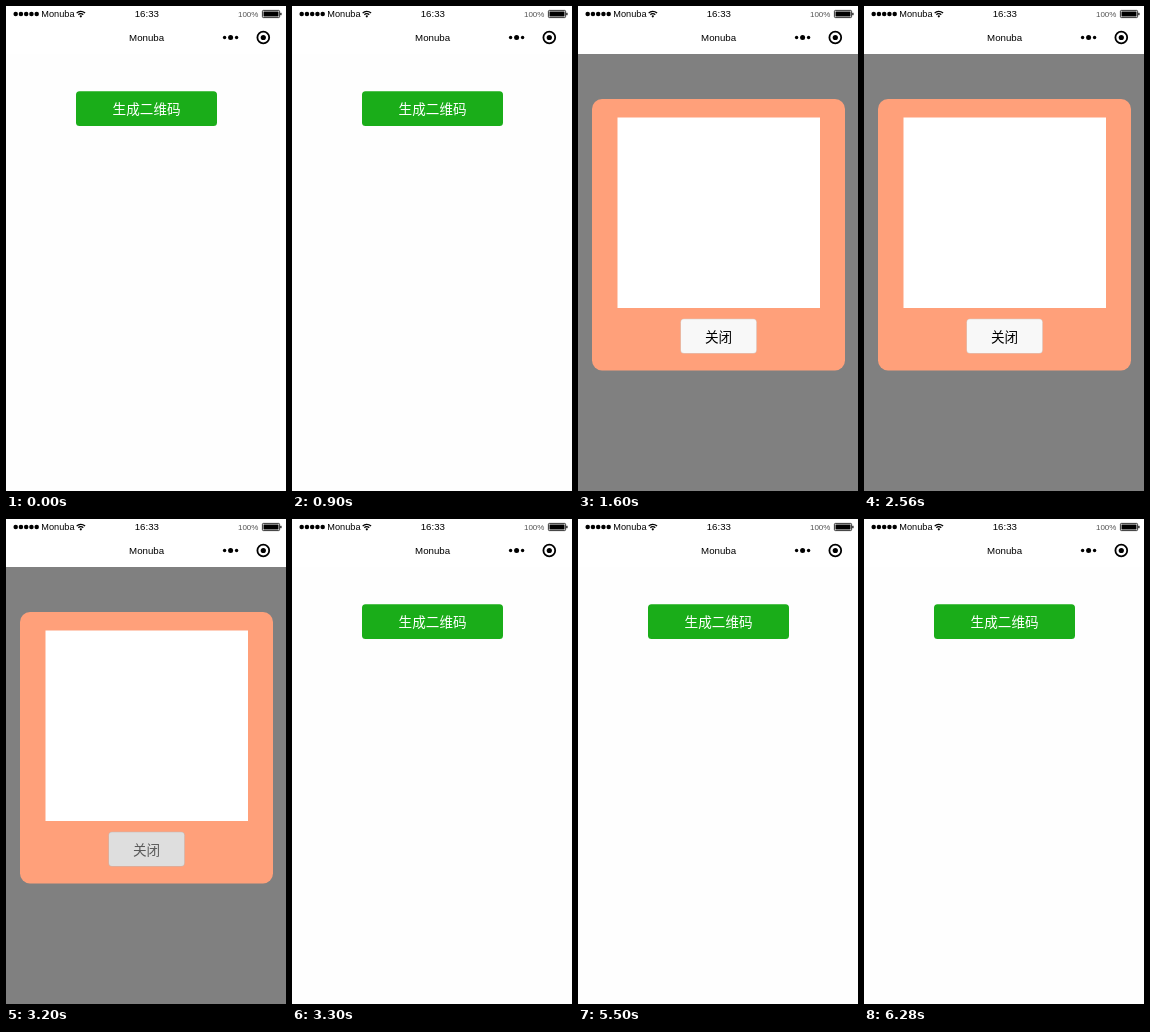
An HTML page with a canvas for the animation above (6.8 s loop, 280 by 485 pixels).

```html
<!DOCTYPE html>
<html lang="zh">
<head>
<meta charset="utf-8">
<title>Dialog demo</title>
<style>
html, body { margin: 0; width: 100%; height: 100%; overflow: hidden; background: #fff; }
canvas { display: block; width: 280px; height: 485px; }
</style>
</head>
<body>
<canvas id="stage"></canvas>
<script>
const W = 280, H = 485, LOOP = 6800;
const APP = 'Monuba';
const LATIN = '"Liberation Sans", Arial, sans-serif';
const HAN = '"Noto Sans CJK SC", "Noto Sans CJK", "Noto Sans CJK JP", sans-serif';

const canvas = document.getElementById('stage');
const ctx = canvas.getContext('2d');
const dpr = window.devicePixelRatio || 1;
canvas.width = W * dpr;
canvas.height = H * dpr;
ctx.scale(dpr, dpr);

// Start time, dialog open, button pressed
const steps = [
  [0, false, false],
  [1500, false, true],
  [1600, true, false],
  [3200, true, true],
  [3300, false, false],
  [4200, true, false],
  [5500, false, false]
];

function rect(x, y, w, h, color) {
  ctx.fillStyle = color;
  ctx.fillRect(x, y, w, h);
}

function round(x, y, w, h, r, color) {
  ctx.fillStyle = color;
  ctx.beginPath();
  ctx.roundRect(x, y, w, h, r);
  ctx.fill();
}

function dot(x, y, r, color = '#000') {
  ctx.fillStyle = color;
  ctx.beginPath();
  ctx.arc(x, y, r, 0, Math.PI * 2);
  ctx.fill();
}

function text(str, x, y, size, color, align = 'left', family = LATIN) {
  ctx.font = `${size}px ${family}`;
  ctx.textAlign = align;
  ctx.fillStyle = color;
  ctx.fillText(str, x, y);
}

function wifi(x, y) {
  ctx.strokeStyle = '#000';
  ctx.lineWidth = 1.3;
  for (const r of [3.3, 5.7]) {
    ctx.beginPath();
    ctx.arc(x, y, r, -Math.PI * 0.76, -Math.PI * 0.24);
    ctx.stroke();
  }
  dot(x, y - 0.7, 1.1);
}

function battery(x, y) {
  ctx.strokeStyle = '#000';
  ctx.lineWidth = 0.8;
  ctx.beginPath();
  ctx.roundRect(x + 0.4, y + 0.4, 17.2, 7.2, 1);
  ctx.stroke();
  rect(x + 1.5, y + 1.5, 15, 5, '#000');
  rect(x + 18.3, y + 2.8, 1.2, 2.4, '#000');
}

function header() {
  rect(0, 0, W, 48, '#fff');
  for (let i = 0; i < 5; i++) dot(9.7 + i * 5.25, 8, 2.25);
  text(APP, 35.3, 11.3, 9.2, '#000');
  wifi(74.8, 11);
  text('16:33', 140.8, 11.3, 9.7, '#000', 'center');
  text('100%', 252.4, 11, 8, '#555', 'right');
  battery(256, 4);

  text(APP, 140.6, 35, 9.7, '#000', 'center');
  dot(218.6, 31.5, 1.7);
  dot(224.6, 31.5, 2.5);
  dot(230.6, 31.5, 1.7);
  ctx.strokeStyle = '#000';
  ctx.lineWidth = 1.8;
  ctx.beginPath();
  ctx.arc(257.3, 31.5, 5.9, 0, Math.PI * 2);
  ctx.stroke();
  dot(257.3, 31.5, 2.6);
}

function page(pressed) {
  rect(0, 48, W, H - 48, '#fefefe');
  round(70, 85.3, 141, 34.7, 3.5, pressed ? '#179b16' : '#1aad19');
  text('生成二维码', 140.6, 108.2, 13.6,
    pressed ? 'rgba(255,255,255,.6)' : '#fff', 'center', HAN);
}

function dialog(pressed) {
  rect(0, 48, W, H - 48, '#808080');
  round(14, 93, 253, 271.5, 10, '#ffa07a');
  rect(39.5, 111.5, 202.5, 190.5, '#fff');
  round(102.5, 312.8, 76.2, 34.6, 3.5, pressed ? '#c4b7b2' : '#d8cdc8');
  round(103, 313.3, 75.2, 33.6, 3, pressed ? '#dedede' : '#f8f8f8');
  text('关闭', 140.6, 335.6, 13.6,
    pressed ? 'rgba(0,0,0,.6)' : '#000', 'center', HAN);
}

function draw(now) {
  const t = now % LOOP;
  const [, open, pressed] = steps.findLast(s => s[0] <= t);
  (open ? dialog : page)(pressed);
  header();
}

const start = performance.now();
function tick() {
  draw(performance.now() - start);
  requestAnimationFrame(tick);
}
tick();
</script>
</body>
</html>
```
